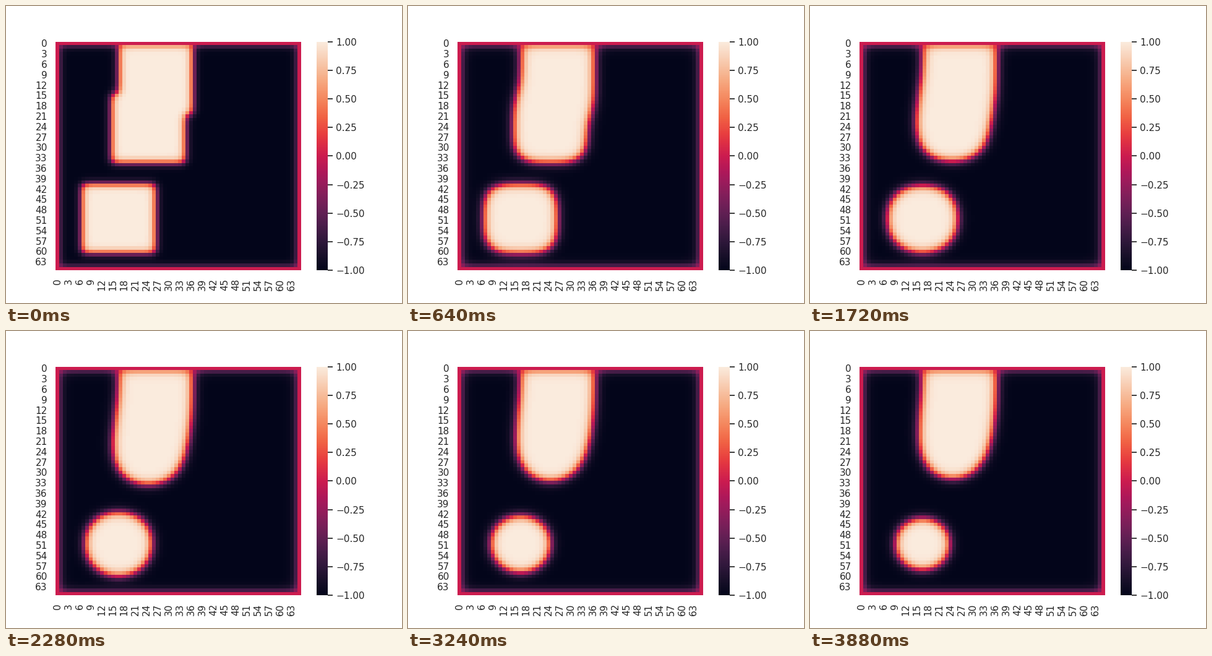
A matplotlib script for the animation above (4 s loop, 640x480 px).

```python
import numpy as np
import matplotlib.pyplot as plt
from matplotlib.animation import FuncAnimation
from matplotlib.colors import LinearSegmentedColormap

FRAMES, INTERVAL = 100, 40
N = 66                     # grid cells per side, fixed border included
DT, SUBSTEPS = 0.1, 4      # Euler step and steps per frame
WARMUP = 8                 # steps taken before the first frame
SIDE = 20
CORNERS = [(1, 17), (15, 15), (41, 7)]   # row, column of each square
INK = "0.15"

# Frames at which the picture is refreshed; it holds in between.
SHOWN = np.array(sorted(
    {*range(13), 14, 15, 76, 84, *range(16, 27, 2), *range(27, 98, 2)}))

plt.rcParams.update({
    "font.family": "DejaVu Sans",
    "text.color": INK,
    "xtick.color": INK,
    "ytick.color": INK,
    "xtick.labelsize": 11,
    "ytick.labelsize": 11,
    "xtick.major.size": 6,
    "ytick.major.size": 6,
    "ytick.major.width": 1.25,
})

ROCKET = LinearSegmentedColormap.from_list("rocket", [
    (0, "#03051a"), (0.051, "#140e26"), (0.1, "#251433"),
    (1 / 7, "#35193e"), (0.2, "#4c1d4b"), (0.25, "#611f53"),
    (2 / 7, "#701f57"), (1 / 3, "#841e5a"), (0.4, "#a11a5b"),
    (3 / 7, "#ad1759"), (0.5, "#cb1b4f"), (4 / 7, "#e13342"),
    (0.6, "#e83f3f"), (2 / 3, "#f06043"), (5 / 7, "#f37651"),
    (0.75, "#f4875e"), (0.8, "#f69c73"), (5 / 6, "#f6aa82"),
    (6 / 7, "#f6b48f"), (1, "#faebdd"),
])


def initial_field():
    u = -np.ones((N, N))
    for row, col in CORNERS:
        u[row:row + SIDE, col:col + SIDE] = 1
    u[[0, -1], :] = 0
    u[:, [0, -1]] = 0
    return u


def advance(u, steps):
    """Allen-Cahn flow with the border held at zero."""
    u = u.copy()
    for _ in range(steps):
        mid = u[1:-1, 1:-1]
        lap = u[:-2, 1:-1] + u[2:, 1:-1] + u[1:-1, :-2] + u[1:-1, 2:] - 4 * mid
        u[1:-1, 1:-1] = mid + DT * (lap + mid - mid ** 3)
    return u


fields = [advance(initial_field(), WARMUP)]
for _ in range(FRAMES - 1):
    fields.append(advance(fields[-1], SUBSTEPS))

fig = plt.figure(figsize=(6.4, 4.8), dpi=100, facecolor="white")
ax = fig.add_axes([0.125, 0.11, 0.62, 0.77])
mesh = ax.pcolormesh(fields[0], cmap=ROCKET, vmin=-1, vmax=1)
ax.set(xlim=(0, N), ylim=(N, 0))
ticks = np.arange(0, N, 3)
ax.set_xticks(ticks + 0.5, ticks, rotation="vertical")
ax.set_yticks(ticks + 0.5, ticks)
for axis in (ax.xaxis, ax.yaxis):
    axis.set_tick_params(bottom=False, left=False)
ax.spines[:].set_visible(False)

cax = fig.add_axes([0.78375, 0.11, 0.77 * 4.8 / 20 / 6.4, 0.77])
bar = fig.colorbar(mesh, cax=cax, ticks=np.linspace(-1, 1, 9))
bar.outline.set_visible(False)


def update(i):
    held = SHOWN[np.searchsorted(SHOWN, i, side="right") - 1]
    mesh.set_array(fields[held])
    return [mesh]


anim = FuncAnimation(fig, update, frames=FRAMES, interval=INTERVAL,
                     repeat=True, repeat_delay=0)
plt.show()
```
